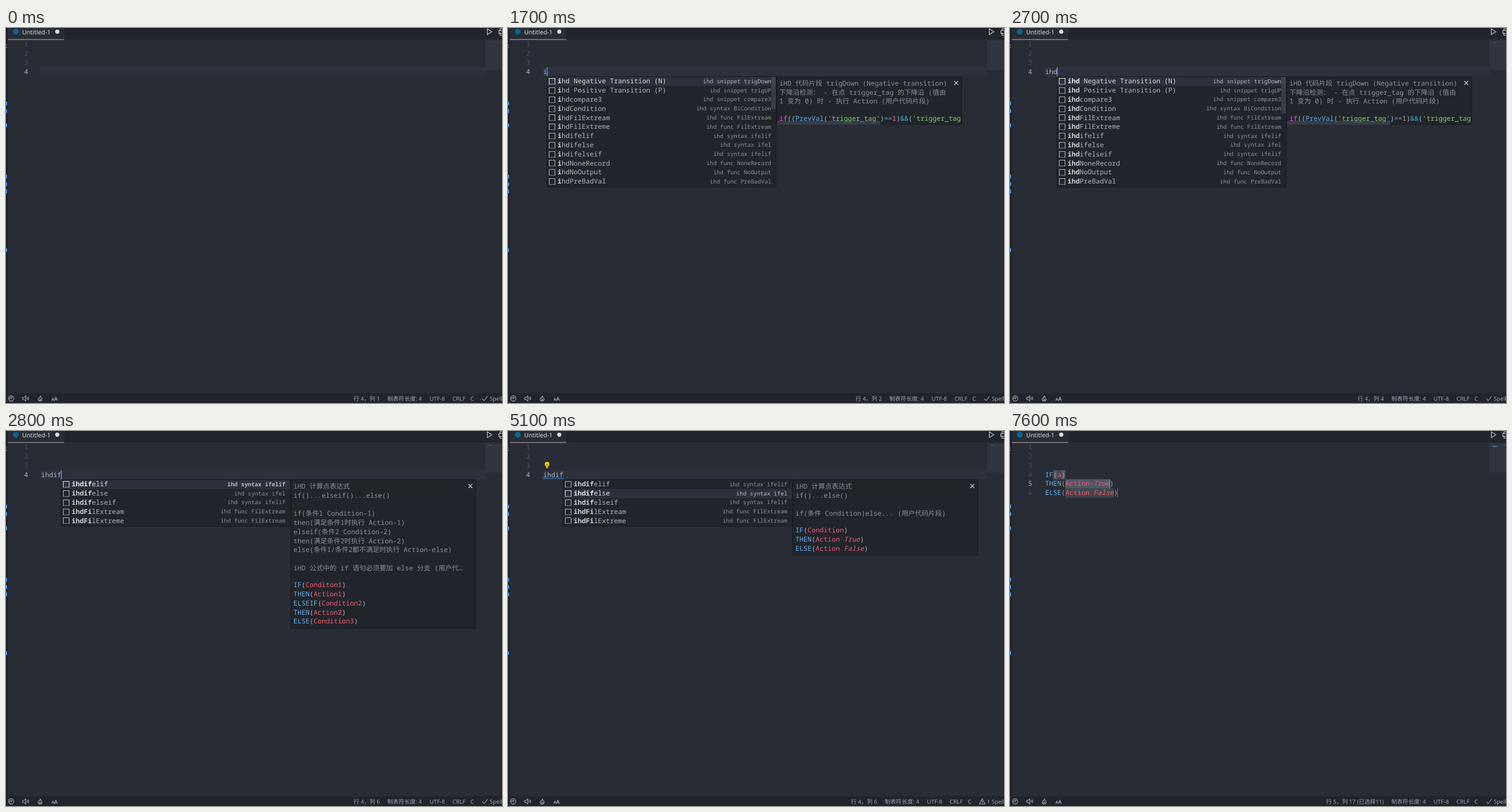
Animation, 861 px wide and 651 px high, one loop 8 s. Source, as an HTML page with a canvas:

```html
<!DOCTYPE html>
<html lang="zh-CN">
<head>
<meta charset="utf-8">
<title>Snippet completion</title>
<style>
html, body { margin: 0; width: 100%; height: 100%; overflow: hidden; background: #282c34; }
canvas { display: block; width: 861px; height: 651px; }
</style>
</head>
<body>
<canvas id="stage" width="861" height="651"></canvas>
<script>
const ctx = document.getElementById('stage').getContext('2d');
const LOOP = 8000, CH = 7, LINE = 15.8, LEFT = 61;
const MONO = '"Noto Sans Mono", "Noto Sans CJK SC", "Noto Sans CJK", monospace';
const SANS = '"Noto Sans", "Noto Sans CJK SC", "Noto Sans CJK", sans-serif';
const C = {
  bg: '#282c34', bar: '#21252b', edge: '#181a1f', row: '#2c313c', text: '#abb2bf', dim: '#8a8e97',
  bright: '#d7dae0', number: '#495162', blue: '#61afef', red: '#ef596f', green: '#89ca78',
  purple: '#d55fde', cyan: '#2bbac5', orange: '#d19a66', caret: '#528bff', mark: '#3b8eea', status: '#9da5b4'
};

const ITEMS = [
  ['ihd Negative Transition (N)', 'ihd snippet trigDown'],
  ['ihd Positive Transition (P)', 'ihd snippet trigUP'],
  ['ihdcompare3', 'ihd snippet compare3'],
  ['ihdCondition', 'ihd syntax BiCondition'],
  ['ihdFilExtream', 'ihd func FilExtream'],
  ['ihdFilExtreme', 'ihd func FilExtream'],
  ['ihdifelif', 'ihd syntax ifelif'],
  ['ihdifelse', 'ihd syntax ifel'],
  ['ihdifelseif', 'ihd syntax ifelif'],
  ['ihdNoneRecord', 'ihd func NoneRecord'],
  ['ihdNoOutput', 'ihd func NoOutput'],
  ['ihdPreBadVal', 'ihd func PreBadVal']
];
const FILTERED = [6, 7, 8, 4, 5].map(i => ITEMS[i]);

// Token lists: [text, colour, style]
const call = (name, arg, tail) => [
  [name, C.blue], ['(', C.text], [arg, C.red], ...(tail ? [[tail, C.red, 'italic']] : []), [')', C.text]
];
const DOCS = {
  trigger: {
    bottom: 168, scroll: true,
    text: ['iHD 代码片段 trigDown (Negative transition)',
      '下降沿检测： - 在点 trigger_tag 的下降沿 (值由',
      '1 变为 0) 时 - 执行 Action (用户代码片段)'],
    code: [[['if', C.purple], ['((', C.text], ['PrevVal', C.blue], ['(', C.text], ["'trigger_tag'", C.green],
      [')', C.text], ['==', C.cyan], ['1', C.orange], [')', C.text], ['&&', C.cyan], ['(', C.text],
      ["'trigger_tag", C.green]]]
  },
  elseif: {
    bottom: 343,
    text: ['iHD 计算点表达式', 'if()...elseif()...else()', '', 'if(条件1 Condition-1)',
      'then(满足条件1时执行 Action-1)', 'elseif(条件2 Condition-2)', 'then(满足条件2时执行 Action-2)',
      'else(条件1/条件2都不满足时执行 Action-else)', '', 'iHD 公式中的 if 语句必须要加 else 分支 (用户代…'],
    code: [call('IF', 'Conditon1'), call('THEN', 'Action1'), call('ELSEIF', 'Condition2'),
      call('THEN', 'Action2'), call('ELSE', 'Condition3')]
  },
  else: {
    bottom: 216,
    text: ['iHD 计算点表达式', 'if()...else()', '', 'if(条件 Condition)else... (用户代码片段)'],
    code: [call('IF', 'Condition'), call('THEN', 'Action ', 'True'), call('ELSE', 'Action ', 'False')]
  }
};

// Times at which the caret opacity changes
const CARET = [[0, 0], [100, 1], [800, 0], [1300, 1], [2200, 0], [2700, 1], [3300, 0], [3900, 1],
  [4300, 0], [4600, 1], [5100, 0], [5500, 1], [6000, 0], [6400, 0.5], [6500, 1], [6900, 0], [7400, 1]];
const TYPED = [[0, ''], [1300, 'i'], [1800, 'ih'], [2700, 'ihd'], [2800, 'ihdif']];
const at = (steps, t) => steps.filter(s => s[0] <= t).pop()[1];
const lineY = n => 75.4 + (n - 4) * LINE;

function box(x, y, w, h, color) {
  ctx.fillStyle = color;
  ctx.fillRect(x, y, w, h);
}

function path(color, width, draw) {
  ctx.strokeStyle = color;
  ctx.lineWidth = width;
  ctx.beginPath();
  draw(ctx);
  ctx.stroke();
}

function dot(x, y, r, color) {
  ctx.fillStyle = color;
  ctx.beginPath();
  ctx.arc(x, y, r, 0, 7);
  ctx.fill();
}

function write(str, x, y, color, font, align = 'left') {
  ctx.font = font;
  ctx.fillStyle = color;
  ctx.textAlign = align;
  ctx.fillText(str, x, y);
}

// y is the middle of the capitals
function mono(str, x, y, color, style = '', size = 11.67, align) {
  write(str, x, y + size * 0.355, color, `${style} ${size}px ${MONO}`, align);
}

function tokens(list, x, y) {
  for (const [str, color, style] of list) {
    mono(str, x, y, color, style);
    x += str.length * CH;
  }
}

function frame(x, y, w, h) {
  box(x, y, w, h, C.bar);
  path(C.edge, 1, c => c.rect(x + 0.5, y + 0.5, w - 1, h - 1));
}

function drawChrome() {
  box(0, 0, 861, 651, C.bg);
  box(0, 0, 861, 20, C.bar);
  box(3, 0, 98, 20, C.bg);
  box(3, 19.5, 98, 1, '#b4b4b4');
  dot(17, 6.5, 5, '#0a6397');
  write('Untitled-1', 28, 11, C.bright, `10.6px ${SANS}`);
  dot(89, 6.3, 3.6, '#dfe1e5');
  path('#c5c9d0', 1.1, c => {
    c.moveTo(835.5, 1.5); c.lineTo(843.5, 6.5); c.lineTo(835.5, 11.5); c.closePath();
    c.rect(855.5, 4.5, 8, 5);
    c.moveTo(857.5, 4); c.lineTo(857.5, 1.5); c.lineTo(861, 1.5);
    c.moveTo(857.5, 7.5); c.lineTo(857.5, 12.5); c.lineTo(861, 12.5);
  });
  box(0, 20, 2, 614, C.bar);
  box(2, 0, 1, 634, C.edge);
  box(0, 29, 1.5, 1, C.text);
  box(0, 33, 1.5, 1, C.text);
  for (const y of [131, 144, 169, 258, 271, 283.5, 385.5]) box(0, y - 3.2, 2, 6.5, C.mark);
}

function drawMinimap(s) {
  box(832, 21, 29, 51.5, '#2f343e');
  box(838, 25, 23, 1, '#3b424e');
  if (s.typed) box(838, 24.5, s.typed.length * 0.9, 1, '#5b6270');
  if (s.stage) {
    box(838, 25.5, 3, 2.5, '#42719a');
    box(841, 25.5, s.stage > 1 ? 5 : 9, 2.5, s.stage > 1 ? '#4a5f79' : '#8d485a');
  }
}

function drawStatus(s) {
  const shift = s.warn ? -8 : 0, font = `9.8px ${SANS}`;
  const label = (str, x, align) => write(str, x + shift, 647, C.status, font, align);
  box(0, 634, 861, 17, C.bar);
  label(s.position, 649, 'right');
  label('制表符长度: 4', 662);
  label('UTF-8', 735.3);
  label('CRLF', 775);
  label('C', 806);
  label(s.warn ? '1 Spell' : 'Spell', s.warn ? 839.5 : 839.7);
  path(C.status, 1.1, c => {
    if (s.warn) {
      c.moveTo(823.2, 638.5); c.lineTo(828, 647.5); c.lineTo(818.4, 647.5); c.closePath();
      c.moveTo(823.2, 641.5); c.lineTo(823.2, 644.5);
      c.moveTo(823.2, 645.4); c.lineTo(823.2, 646.4);
    } else {
      c.moveTo(827, 643.7); c.lineTo(830, 647); c.lineTo(836, 639);
    }
    // gauge
    c.moveTo(13.6, 643); c.arc(9, 643, 4.6, 0, 6.3);
    c.moveTo(6.4, 644.5); c.arc(9, 643.5, 2.6, 2.8, 5.2);
    c.moveTo(8.6, 644.4); c.lineTo(11.4, 641);
    // speaker
    c.moveTo(29, 641.2); c.lineTo(31.4, 641.2); c.lineTo(34.4, 638.6); c.lineTo(34.4, 647.6);
    c.lineTo(31.4, 645); c.lineTo(29, 645); c.closePath();
    c.moveTo(36.3, 641.3); c.arc(35, 643, 2.2, -0.9, 0.9);
    c.moveTo(38.2, 640); c.arc(35, 643, 4.4, -0.75, 0.75);
    // flame
    c.moveTo(59.5, 638.3); c.quadraticCurveTo(60, 640.5, 62, 642.2);
    c.quadraticCurveTo(64, 647.6, 59.3, 647.8); c.quadraticCurveTo(55, 647.4, 56.2, 642.8);
    c.quadraticCurveTo(59.8, 642, 59.5, 638.3);
    c.moveTo(58.3, 647); c.quadraticCurveTo(58, 645, 59.6, 643.8); c.quadraticCurveTo(61.3, 645.5, 60.6, 647);
  });
  write('A', 79, 647, C.status, `bold 7px ${SANS}`);
  write('A', 83.6, 647, C.status, `bold 9px ${SANS}`);
}

function drawCaret(col, line, opacity) {
  ctx.globalAlpha = opacity;
  box(LEFT + col * CH - 0.7, lineY(line) - 7.4, 1.5, 16, C.caret);
  ctx.globalAlpha = 1;
}

function drawNumbers(count, active) {
  for (let n = 1; n <= count; n++) {
    mono(n, 38.5, lineY(n), n === active ? C.text : C.number, '', 11.67, 'right');
  }
}

function drawHint() {
  dot(67.8, 57.6, 4, '#ffcc00');
  box(66, 60, 3.6, 3.2, '#ffcc00');
  box(66.2, 63.7, 3.2, 1.2, '#ffcc00');
  box(67.3, 57, 1, 3.6, C.bg);
}

function drawSquiggle() {
  path('#3794ff', 1, c => {
    for (let x = 0; x <= 35; x += 1.75) c.lineTo(LEFT + x, x / 1.75 % 2 ? 81.4 : 83.2);
  });
}

function drawList(x, items, matched, selected) {
  const full = items.length > 5;
  frame(x, 84, 399, items.length * LINE + 3);
  box(x + 1, 85 + selected * LINE, 397, LINE, C.row);
  items.forEach(([name, detail], i) => {
    const y = 92.2 + i * LINE, on = i === selected, color = on ? C.bright : C.text;
    const iy = Math.round(y - 5) + 0.5;
    path(color, 1.1, c => {
      c.moveTo(x + 4.5, iy + 10); c.lineTo(x + 4.5, iy); c.lineTo(x + 14.5, iy); c.lineTo(x + 14.5, iy + 10);
      for (const d of [4, 7, 10, 13]) { c.moveTo(x + d, iy + 10); c.lineTo(x + d + 2, iy + 10); }
    });
    mono(name.slice(0, matched), x + 19, y, on ? '#e6e8ec' : '#ced2d9', 'bold');
    mono(name.slice(matched), x + 19 + matched * CH, y, color);
    const heavy = on && !full && selected === 0 ? 'bold' : '';
    mono(detail, x + 390, y, on ? '#b4b8c0' : C.dim, heavy, 9.9, 'right');
  });
  if (full) box(x + 390, 85, 8, matched > 2 ? 63 : 56, 'rgba(78,86,102,.5)');
}

function drawDoc(x, doc) {
  const tx = x + 404;
  frame(x + 399, 84, 322, doc.bottom - 84);
  doc.text.forEach((str, i) => mono(str, tx, 95.6 + i * LINE, C.dim));
  const top = 95.6 + (doc.text.length - 1) * LINE + 29.2;
  doc.code.forEach((list, i) => tokens(list, tx, top + i * LINE));
  if (doc.scroll) box(x + 400, 161, 179, 7, 'rgba(78,86,102,.5)');
  path('#c5c9d0', 1.1, c => {
    c.moveTo(x + 707.5, 92); c.lineTo(x + 714.5, 99);
    c.moveTo(x + 714.5, 92); c.lineTo(x + 707.5, 99);
  });
}

function drawTyping(t, s) {
  const col = s.typed.length, x = LEFT + col * CH - 1;
  box(60, 68, 772, 16, C.row);
  drawNumbers(4, 4);
  mono(s.typed, LEFT, lineY(4), C.text);
  if (t >= 3200) { drawHint(); drawSquiggle(); }
  drawCaret(col, 4, at(CARET, t));
  if (!col) return;
  if (col < 5) {
    drawList(x, ITEMS, col, 0);
    drawDoc(x, DOCS.trigger);
  } else {
    const second = t >= 4100;
    drawList(x, FILTERED, 5, second ? 1 : 0);
    drawDoc(x, second ? DOCS.else : DOCS.elseif);
  }
}

function drawSnippet(t, s) {
  const hole = '#41454c', picked = '#515867', last = s.stage === 3;
  const fill = (col, line, n, color) => box(LEFT + col * CH, lineY(line) - 7.4, n * CH, 16, color);
  const paint = list => list.map(tok => tok[1] === C.text ? [tok[0], C.orange] : tok);
  if (s.stage === 2) box(60, 68, 772, 16, C.row);
  drawNumbers(6, last ? 5 : 4);
  if (s.stage === 1) fill(3, 4, 9, picked);
  else { fill(2, 4, 3, '#50555f'); fill(3, 4, 1, hole); }
  fill(5, 5, 11, last ? picked : hole);
  fill(5, 6, 12, hole);
  tokens(paint(call('IF', s.stage === 1 ? 'Condition' : 'a')), LEFT, lineY(4));
  tokens(paint(DOCS.else.code[1]), LEFT, lineY(5));
  tokens(paint(DOCS.else.code[2]), LEFT, lineY(6));
  if (last) dot(LEFT + 11.5 * CH, lineY(5) + 0.5, 0.8, '#8b93a3');
  box(186, lineY(6) - 7.4, 1, 16, '#8a7456');
  if (t < 6100) drawHint();
  drawCaret(s.stage === 1 ? 12 : last ? 16 : 4, last ? 5 : 4, at(CARET, t));
}

function render(t) {
  const stage = t < 5500 ? 0 : t < 7400 ? 1 : t < 7600 ? 2 : 3;
  const typed = stage ? '' : at(TYPED, t);
  const s = {
    stage, typed, warn: t >= 3700 && t < 6100,
    position: [`行 4，列 ${typed.length + 1}`, '行 4，列 13 (已选择9)', '行 4，列 5', '行 5，列 17 (已选择11)'][stage]
  };
  drawChrome();
  drawMinimap(s);
  if (stage) drawSnippet(t, s);
  else drawTyping(t, s);
  drawStatus(s);
}

ctx.fontKerning = 'none';
ctx.textRendering = 'geometricPrecision';
const start = performance.now();
function tick() {
  render((performance.now() - start) % LOOP);
  requestAnimationFrame(tick);
}
tick();
</script>
</body>
</html>
```
